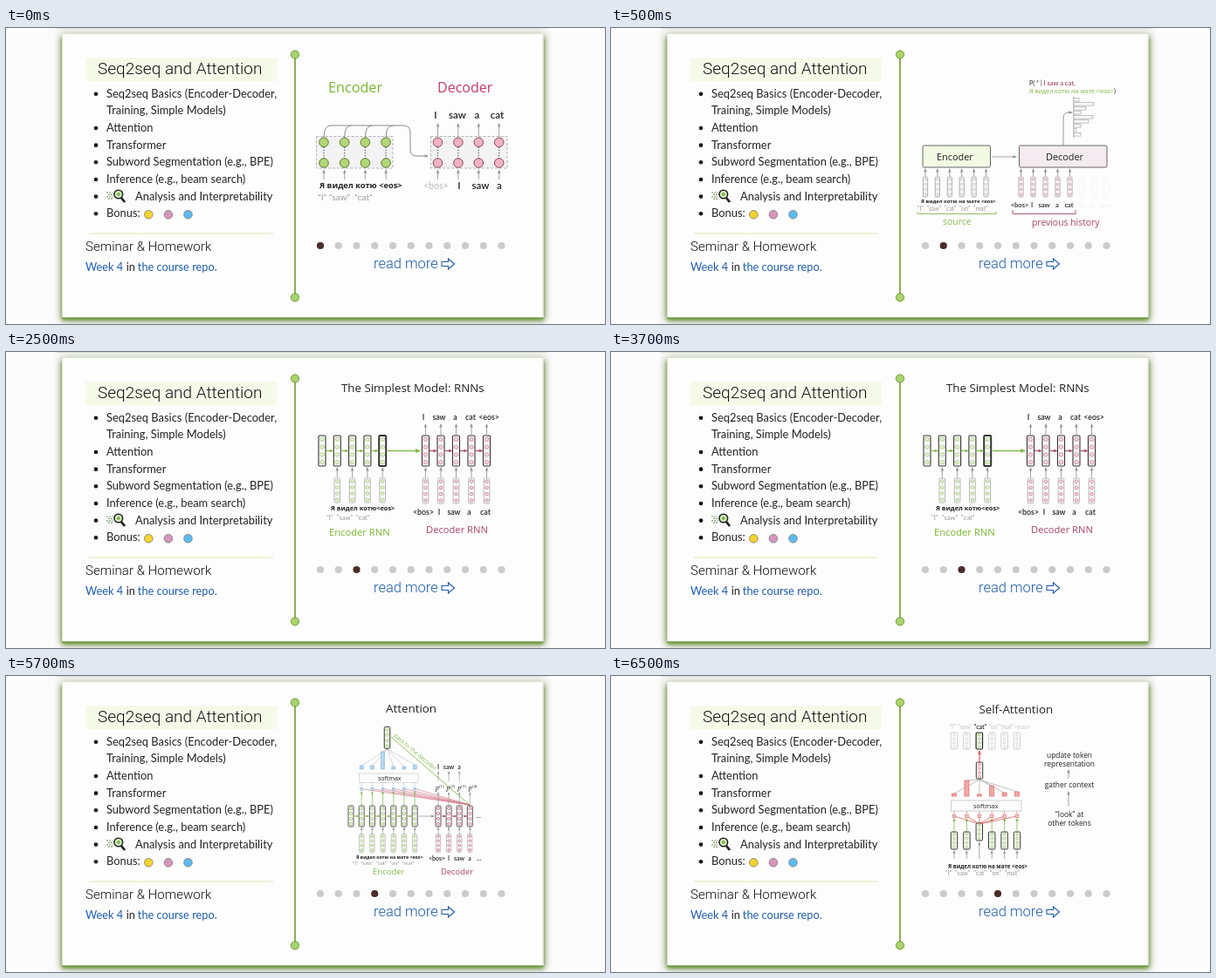
An HTML page with a canvas for the animation above (8 s loop, 686x340 px).

```html
<!DOCTYPE html>
<html lang="en">
<head>
<meta charset="utf-8">
<title>Seq2seq and Attention</title>
<style>
  html, body { margin: 0; width: 100%; height: 100%; overflow: hidden; background: #fcfcfc; }
  canvas, svg { position: absolute; left: 0; top: 0; width: 686px; height: 340px; }
  text { white-space: pre; }
</style>
</head>
<body>
<canvas id="shapes"></canvas>
<svg id="words" viewBox="0 0 686 340"></svg>
<script>
const W = 686, H = 340, LOOP = 8000;
const canvas = document.getElementById('shapes');
const layer = document.getElementById('words');
const ctx = canvas.getContext('2d');
const dpr = window.devicePixelRatio || 1;
canvas.width = W * dpr;
canvas.height = H * dpr;

const LIGHT = { font: 'Roboto, "Liberation Sans", sans-serif', weight: 300, fill: '#111' };
const HAND = 'Lato, "Noto Sans", sans-serif';
const SANS = '"Open Sans", "Noto Sans", sans-serif';
const CYR = '"Noto Sans", sans-serif';
const SERIF = '"Liberation Serif", serif';
const INK = '#222', GRAY = '#999', GREEN = '#86b94a', PINK = '#c4507a', MAROON = '#a8446a', BLUE = '#1c5cab';
const RUS = 'Я видел котю на мате <eos>';
const GLOSS = '"I"  "saw"  "cat"  "on"  "mat"';

function text(s, x, y, size, { fill = INK, font = HAND, anchor = 'start', weight = 400, turn = 0, style = 'normal' } = {}) {
  const el = document.createElementNS('http://www.w3.org/2000/svg', 'text');
  const attrs = { x, y, fill, 'font-size': size, 'font-family': font, 'font-weight': weight, 'font-style': style, 'text-anchor': anchor };
  for (const k in attrs) el.setAttribute(k, attrs[k]);
  if (turn) el.setAttribute('transform', `rotate(${turn} ${x} ${y})`);
  el.textContent = s;
  layer.append(el);
}

// Centred words, each at its own x
function row(words, xs, y, size, opt = {}) {
  words.split(' ').forEach((s, i) => text(s, xs[i], y, size, { anchor: 'middle', weight: 600, ...opt }));
}

const steps = (x, gap, n) => Array.from({ length: n }, (_, i) => x + gap * i);

function rect(x, y, w, h, fill, stroke, lw = 1) {
  if (fill) { ctx.fillStyle = fill; ctx.fillRect(x, y, w, h); }
  if (stroke) { ctx.strokeStyle = stroke; ctx.lineWidth = lw; ctx.strokeRect(x, y, w, h); }
}

function box(x, y, w, h, r, fill, stroke, lw = 1) {
  ctx.beginPath();
  ctx.roundRect(x, y, w, h, r);
  ctx.fillStyle = fill;
  ctx.fill();
  ctx.strokeStyle = stroke;
  ctx.lineWidth = lw;
  ctx.stroke();
}

function disc(x, y, r, fill, stroke, lw = 1) {
  ctx.beginPath();
  ctx.arc(x, y, r, 0, Math.PI * 2);
  if (fill) { ctx.fillStyle = fill; ctx.fill(); }
  if (stroke) { ctx.strokeStyle = stroke; ctx.lineWidth = lw; ctx.stroke(); }
}

function path(d, color, lw = 1, dash = []) {
  ctx.strokeStyle = color;
  ctx.lineWidth = lw;
  ctx.setLineDash(dash);
  ctx.stroke(new Path2D(d));
  ctx.setLineDash([]);
}

const line = (x1, y1, x2, y2, color, lw, dash) => path(`M${x1} ${y1}L${x2} ${y2}`, color, lw, dash);

function arrow(x1, y1, x2, y2, color = '#999', lw = 0.9, head = 3.6) {
  line(x1, y1, x2, y2, color, lw);
  ctx.save();
  ctx.translate(x2, y2);
  ctx.rotate(Math.atan2(y2 - y1, x2 - x1));
  ctx.fillStyle = color;
  ctx.fill(new Path2D(`M1 0L${-head} ${-head / 2}L${-head} ${head / 2}Z`));
  ctx.restore();
}

// Column of four cells
function vec(x, top, w, h, stroke, dot, lw = 1) {
  box(x - w / 2, top, w, h, 1.2, '#fff', stroke, lw);
  for (let i = 0; i < 4; i++) disc(x, top + h * (i + 0.5) / 4, Math.min(w * 0.28, h * 0.08), dot + '33', dot, 0.6);
}

function shadow(color, blur, drop) {
  ctx.save();
  ctx.shadowColor = color;
  ctx.shadowBlur = blur * dpr;
  ctx.shadowOffsetY = drop * dpr;
  rect(64, 7, 551.5, 326.5, '#fff');
  ctx.restore();
}

function frame() {
  rect(0, 0, W, H, '#fcfcfc');
  rect(56, 0, 567, H, '#f9f9f8');
  rect(58, 0, 562, 1, '#dfe5d2');
  shadow('#9aa58a', 10, 1);
  shadow('#5f8c28', 5, 2.5);
  rect(64.5, 6.5, 550.5, 326, '#fdfdfd', '#dde4d0');
  rect(64, 332.5, 551.5, 1.5, '#6f9a36');

  rect(91, 34, 219, 27, '#f5fae8');
  text('Seq2seq and Attention', 105, 53.3, 19, LIGHT);
  line(95, 236, 306, 236, '#e3e6b4');

  const items = ['Seq2seq Basics (Encoder-Decoder,', 'Training, Simple Models)', 'Attention', 'Transformer',
    'Subword Segmentation (e.g., BPE)', 'Inference (e.g., beam search)', 'Analysis and Interpretability', 'Bonus:'];
  items.forEach((s, i) => {
    const y = 79.7 + i * 19.65;
    text(s, i === 6 ? 148 : 115, y, 12.9);
    if (i !== 1) disc(103, y - 4, 2.3, '#111');
  });
  ['#f8d32f', '#d796bd', '#5bbcf0'].forEach((c, i) => disc(163.3 + i * 22.6, 214.3, 4.8, c, '#777', 0.8));

  for (let i = 0; i < 4; i++) line(115 + i % 2 * 2, 189 + i * 2.4, 122, 189 + i * 2.4, '#7d9a68', 1.2, [2, 1]);
  line(132, 195, 136, 200, '#222', 2.8);
  disc(128.8, 191, 4.8, '#d9efc0', '#222', 1.6);
  disc(128.8, 191, 2, '#79b84a');

  text('Seminar & Homework', 91, 256.3, 15.1, LIGHT);
  text('Week 4', 91, 279, 12.8, { fill: BLUE });
  text('in', 137.7, 279, 12.8);
  text('the course repo.', 150.8, 279, 12.8, { fill: BLUE });

  line(331, 31, 331, 309, '#8caf55', 2);
  for (const y of [30.5, 309.5]) disc(331, y, 4.6, '#a9d36c', '#6f9a3c');

  text('read more', 421, 276.2, 16.5, { ...LIGHT, fill: BLUE });
  path('M499 268.5H506.5V265L513.5 271L506.5 277V273.5H499Z', BLUE, 1.1);
}

function pager(active) {
  for (let i = 0; i < 11; i++) disc(360 + i * 20.75, 250, 4.1, i === active ? '#4a2c28' : '#cbcbcb');
}

function overview() {
  text('Encoder', 369, 74, 16.2, { fill: '#7ab530', font: SANS });
  text('Decoder', 494, 74, 16, { fill: '#c23c6c', font: SANS });
  const enc = steps(364, 23.7, 4), dec = steps(494.5, 23.4, 4);
  for (const [xs, x0, fill, edge] of [[enc, 355.5, '#b2d677', '#5c7a35'], [dec, 486.5, '#f0b3c3', '#8a4a5e']]) {
    rect(x0, 124.5, 87.5, 36.5, '#f3f3f3');
    path(`M${x0} 124.5h87.5v36.5h-87.5z`, '#aaa', 0.9, [3, 2]);
    for (const x of xs) {
      line(x, 137, x, 150, '#555', 1.2, [1.3, 1.7]);
      disc(x, 131.3, 5.3, fill, edge);
      disc(x, 155, 5.3, fill, edge);
      arrow(x, 174, x, 163.5);
    }
  }
  for (const x of dec) arrow(x, 125, x, 110);
  for (const x of enc) path(`M${x} 126Q${x} 112 ${x + 8} 112`, '#888');
  path('M372 112H455Q463 112 463 120V140Q463 147 470 147H478', '#888');
  arrow(477, 147, 483, 147);
  row('I saw a cat', [492, 517, 539.5, 562.5], 104, 11.5);
  text('Я видел котю <eos>', 359, 184, 9.3, { font: CYR, weight: 600 });
  text('"I" "saw"  "cat"', 357, 198, 10, { fill: GRAY });
  text('<bos>', 478, 185, 10.5, { fill: '#bbb' });
  row('I saw a', [519, 543.5, 565], 185, 11.5);
}

function language() {
  text('P( * |', 479, 65.5, 7.2);
  text('I saw a cat,', 495.5, 65.5, 7.5, { fill: MAROON, weight: 600 });
  text(RUS, 479, 74.5, 7.1, { fill: GREEN, font: CYR });
  text(')', 576, 74.5, 7.2);
  line(530, 79, 530, 126, '#999', 0.8);
  [6, 23, 14, 8, 22, 17, 8, 3, 8].forEach((w, i) => rect(530, 80.5 + i * 5, w, 3.6, '#f8f8f8', '#aaa', 0.7));
  path('M518 135V104Q518 97 524 97', '#999');
  arrow(523, 97, 528, 97);
  box(357, 135, 77.5, 25, 1.5, '#f3fae3', '#666');
  box(467.5, 135, 100.5, 25, 1.5, '#f3ebf0', '#666');
  text('Encoder', 373, 151.7, 10.9, { font: SANS });
  text('Decoder', 498, 151.7, 10.9, { font: SANS });
  arrow(436, 148, 464, 148);
  for (const x of steps(360, 13.9, 6)) { vec(x, 171, 5.2, 23, '#999', '#aaa', 0.8); arrow(x, 170, x, 162); }
  for (const x of steps(469.5, 14, 5)) { vec(x, 171, 5.2, 23, '#a99', '#c07a98', 0.8); arrow(x, 170, x, 162); }
  for (const x of steps(539.5, 14, 3)) vec(x, 171, 5.2, 23, '#f6f6f6', '#f4f4f4');
  text(RUS, 355, 201, 5.9, { font: CYR, weight: 600 });
  text(GLOSS, 351, 210, 6.8, { fill: GRAY });
  row('<bos> I saw a cat', [468, 482, 496, 511, 524.5], 205.5, 7.6);
  row('on a mat', [539, 552, 567], 205.5, 7.6, { fill: '#f2f2f2' });
  path('M351 211V213.5H441V211', GREEN, 0.9);
  path('M460 209V213.5H532V209', MAROON, 0.9);
  text('source', 380, 226, 10.5, { fill: GREEN, font: SANS });
  text('previous history', 482, 227, 10.4, { fill: MAROON, font: SANS });
}

function recurrent() {
  text('The Simplest Model: RNNs', 384, 46, 13.3, { font: SANS });
  const enc = steps(362, 17.3, 5), dec = steps(480.5, 17.5, 5);
  enc.forEach((x, i) => {
    vec(x, 96, 8, 35, '#333', GREEN, i === 4 ? 2 : 1.1);
    if (!i) return;
    arrow(x - 13, 113.5, x - 5, 113.5, GREEN, 1.1, 3.5);
    vec(x, 145, 6.6, 28, '#aaa', GREEN, 0.9);
    arrow(x, 144, x, 133);
  });
  arrow(437, 113.5, 474, 113.5, GREEN, 1.4, 5);
  dec.forEach((x, i) => {
    vec(x, 96, 8, 35, '#333', PINK, 1.1);
    vec(x, 145, 6.6, 29, '#aaa', PINK, 0.9);
    if (i) arrow(x - 13, 113.5, x - 5, 113.5, MAROON, 1, 3.5);
    arrow(x, 95, x, 83);
    arrow(x, 144, x, 133);
  });
  row('I saw a cat <eos>', [478, 496, 514.5, 532, 553], 77.5, 8.8);
  text('Я видел котю<eos>', 372, 182, 7.4, { font: CYR, weight: 600 });
  text('"I"  "saw"  "cat"', 367, 192.5, 7.6, { fill: GRAY });
  row('<bos> I saw a cat', [478, 496, 513, 530.5, 549], 186.5, 8.8);
  text('Encoder RNN', 370, 211, 11.2, { fill: '#7ab530', font: SANS });
  text('Decoder RNN', 481, 208, 11.2, { fill: MAROON, font: SANS });
}

function attention() {
  text('Attention', 435, 42, 13.4, { font: SANS });
  const enc = steps(395, 12.2, 7), dec = steps(495, 12.1, 4);
  const bars = [4, 4, 20, 3, 3, 5];
  enc.forEach((x, i) => {
    if (i) {
      const h = bars[i - 1];
      line(436.5, 84, x, 107 - h, '#bbb', 0.6);
      rect(x - 2, 107 - h, 4, h, '#b4d6f3', '#86b2da', 0.6);
      line(531, 148, x + 2, 130, '#d06880', 0.6);
      arrow(x, 148, x, 133, GREEN, 0.7, 2.5);
      rect(x - 1.4, 128.3, 2.8, 2.8, '#c6e0f6', '#7dabd6', 0.6);
      line(x, 127, x, 123, '#a5c4e2', 0.6);
      vec(x, 181.5, 5.2, 21, '#aaa', GREEN, 0.7);
      arrow(x, 181, x, 174.5, '#999', 0.7, 2.5);
      arrow(x - 8.5, 161, x - 4, 161, GREEN, 0.7, 2.5);
    }
    vec(x, 149, 6, 24, '#444', GREEN, 0.9);
  });
  vec(436.5, 58.3, 6.5, 25, '#333', GREEN);
  rect(404.5, 112, 67.5, 10.5, '#fcfcfc', '#ccc', 0.7);
  text('softmax', 426, 119.8, 7, { font: SANS });
  line(441, 70, 531, 148, GREEN, 0.9);
  text('pass to the decoder', 443.5, 69, 6.7, { fill: GREEN, font: SANS, turn: 40 });
  arrow(473, 161, 490, 161, '#999', 0.8, 3);
  dec.forEach((x, i) => {
    vec(x, 149, 6, 24, '#444', PINK, 0.9);
    vec(x, 181.5, 5.2, 21, '#aaa', PINK, 0.7);
    arrow(x, 181, x, 174.5, '#999', 0.7, 2.5);
    arrow(x, 148, x, 134, '#999', 0.7, 2.5);
    if (i) arrow(x - 8.5, 161, x - 4, 161, MAROON, 0.7, 2.5);
    if (i < 3) arrow(x, 121, x, 110, '#999', 0.7, 2.5);
    const px = 492 + i * 12.6;
    text('p', px, 130.5, 7.5, { font: SERIF, style: 'italic' });
    text(`(${i + 1})`, px + 4, 127.5, 4.8, { font: SERIF });
  });
  row('I saw a', [495, 507, 519], 107, 7.2);
  text('…', 538, 162.5, 8);
  text(RUS, 401, 210.3, 5.25, { font: CYR, weight: 600 });
  text(GLOSS, 397, 217, 6, { fill: GRAY });
  row('<bos> I saw a …', [493.5, 507, 519, 531, 542], 211.5, 7);
  text('Encoder', 420, 228, 9.5, { fill: GREEN, font: SANS });
  text('Decoder', 498, 228, 9.4, { fill: MAROON, font: SANS });
}

function selfAttention() {
  const RED = '#de6464';
  text('Self-Attention', 421.5, 43, 13.3, { font: SANS });
  const bars = [3, 18, 2, 12, 4, 5];
  steps(393, 14.4, 6).forEach((x, i) => {
    const me = i === 2, top = me ? 169 : 179;
    vec(x, 65, 7.4, 19, me ? '#222' : '#c4c4c4', me ? GREEN : '#d0d0d0', me ? 1.2 : 0.8);
    line(422, 119, x, 138 - bars[i], '#aaa', 0.7);
    rect(x - 2.5, 138 - bars[i], 5, bars[i], '#f2a8a8', RED, 0.7);
    line(422, 170, x, 161, RED, 0.8);
    if (!me) arrow(x, 178, x, 164, GREEN, 0.8, 3);
    rect(x - 1.7, 159.2, 3.4, 3.4, '#fbd5d5', RED, 0.7);
    line(x, 158, x, 155.5, RED, 0.7);
    arrow(x, 210, x, me ? 191.5 : 201, '#999', 0.8, 3);
    vec(x, top, 7.4, 20, '#333', GREEN);
  });
  arrow(422, 98, 422, 86, RED, 1.3, 4);
  vec(422, 99, 7.4, 19, '#333', RED);
  rect(389.5, 143, 80.5, 12, '#fcfcfc', '#c4c4c4', 0.8);
  text('softmax', 415, 151.8, 7.5, { font: SANS });
  const tops = [391, 405.5, 423, 438.5, 453, 471];
  row('"I" "saw"  "on" "mat" <eos>', tops, 61, 6.8, { fill: '#c2c2c2', weight: 400 });
  row('"cat"', [tops[2]], 61, 7);
  text(RUS, 386, 220.5, 6.25, { font: CYR, weight: 600 });
  text(GLOSS, 383, 229, 7.2, { fill: GRAY });
  [['update token', 94], ['representation', 104], ['gather context', 127.5], ['“look” at', 162], ['other tokens', 172]]
    .forEach(([s, y]) => text(s, 525, y, 8.4, { font: SANS, anchor: 'middle' }));
  arrow(524, 118, 524, 108);
  arrow(524, 150, 524, 133);
}

const slides = [overview, language, recurrent, attention, selfAttention];
let shown = -1;

function draw(i) {
  ctx.setTransform(dpr, 0, 0, dpr, 0, 0);
  ctx.clearRect(0, 0, W, H);
  layer.replaceChildren();
  frame();
  pager(i);
  slides[i]();
}

function tick() {
  const t = performance.now() % LOOP;
  const i = t < 500 ? 0 : 1 + Math.floor((t - 500) / 2000);
  if (i !== shown) draw(shown = i);
  requestAnimationFrame(tick);
}
tick();
</script>
</body>
</html>
```
